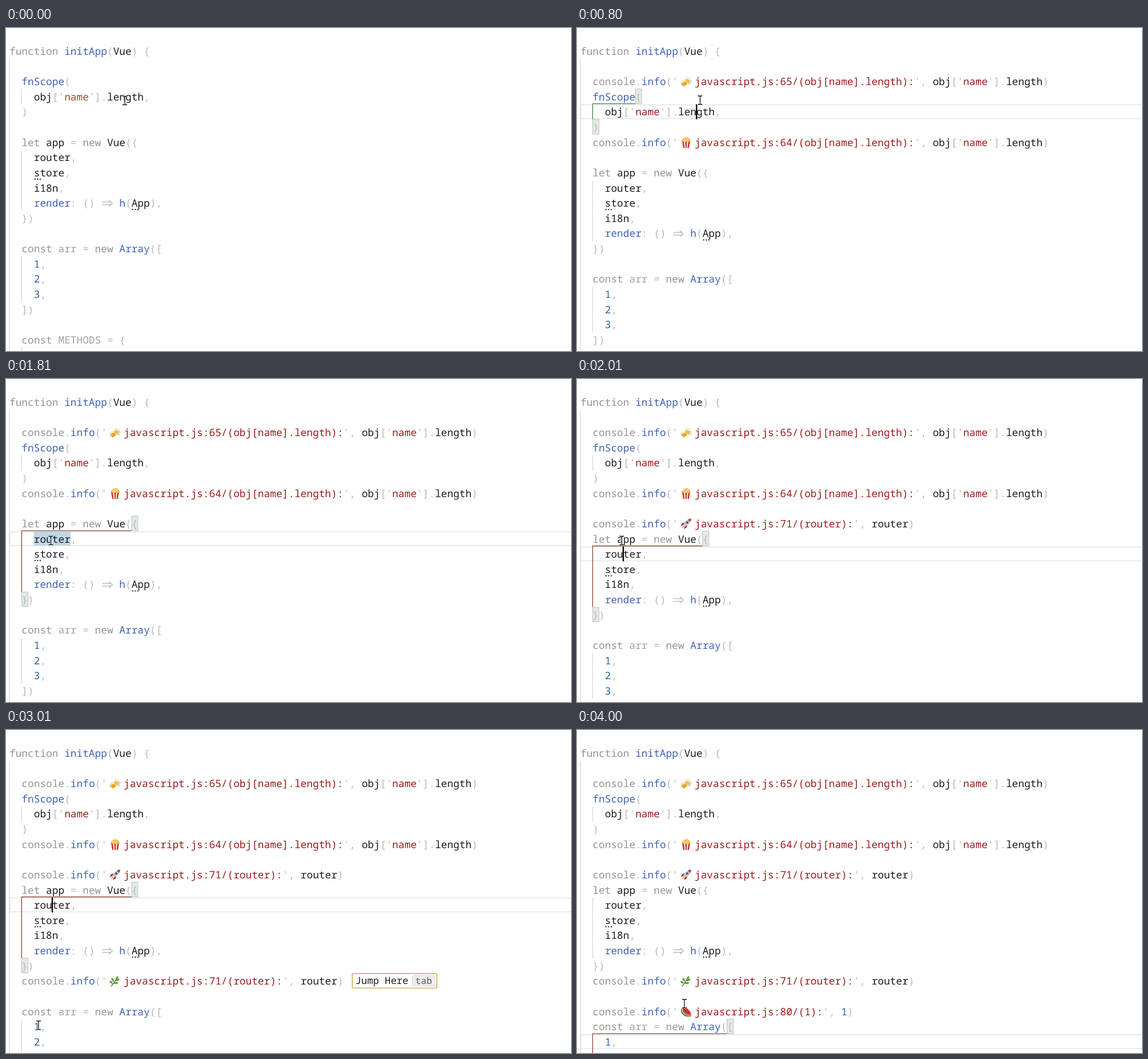
Animation, 989 px wide and 566 px high, one loop 4.2 s. Source, as an HTML page:

```html
<!DOCTYPE html>
<html lang="en">
<head>
<meta charset="utf-8">
<title>Console log insertion</title>
<style>
  html, body { margin: 0; width: 100%; height: 100%; overflow: hidden; background: #fff; }
  svg { display: block; }
  text { font: 17.81px "Noto Sans Mono", "DejaVu Sans Mono", monospace; text-rendering: geometricPrecision; }
  .key { fill: #949494; }
  .faded { fill: #a3a3a3; }
  .fn { fill: #3f62b3; }
  .num { fill: #2c639b; }
  .str { fill: #9a1c1c; }
  .warm { fill: #9c4a2c; }
  .word { fill: #1c1c22; }
  .sym { fill: #b9b9b9; }
</style>
</head>
<body>
<svg width="989" height="566" viewBox="0 0 989 566">
  <defs>
    <g id="beer">
      <path d="M1 10l7-3 4 8-7 4z" fill="#f0a323"/>
      <path d="M10 3l8 3-3 8-7-3z" fill="#f7bd45"/>
      <path d="M1 10l7-3 1 3-7 3z" fill="#f3ead2"/>
      <path d="M9 3q2-3 5-1t5 2l-1 4-9-3z" fill="#f6eedb"/>
      <path d="M16 8l3 1-2 5-3-1M4 16l-2 0-1-4" fill="none" stroke="#b5c8d4" stroke-width="1.3"/>
    </g>
    <g id="popcorn">
      <path d="M3 8h14l-2 12H5z" fill="#fff"/>
      <path d="M3 8h3l1.5 12H5zM8.5 8h3l-.4 12H8.9zM14 8h3l-2 12h-2.5z" fill="#c93a2e"/>
      <path d="M2 9q-1-4 3-4 0-4 4-3 3-3 5 1 4 0 3 3 2 1 1 3z" fill="#f3bd55"/>
      <path d="M6 6l2-2M11 6l2-2M9 8l1-2" stroke="#fbe6ac" stroke-width="1.6"/>
    </g>
    <g id="rocket">
      <path d="M7 8Q2 8 1 14l5-2zM12 13q0 5-6 6l2-5z" fill="#b32c35"/>
      <path d="M5 12Q9 2 18 2q0 9-10 13z" fill="#b9c5ce"/>
      <path d="M13 3q3-2 6-2 0 3-2 6z" fill="#c8323c"/>
      <circle cx="12" cy="8" r="2" fill="#3d5870"/>
      <path d="M5 13l2 2-5 4z" fill="#f2a23a"/>
    </g>
    <g id="herb" fill="#5f9c3d">
      <path d="M3 19Q8 13 15 3" fill="none" stroke="#557f32" stroke-width="1.5"/>
      <path d="M11 8q-1-5 4-7 2 5-4 7zM8 11Q2 9 4 4q5 2 4 7zM6 14q-5 1-6-4 5-1 6 4zM10 10q2-5 8-4-2 5-8 4zM7 14q4-4 9-1-4 4-9 1z"/>
    </g>
    <g id="melon">
      <path d="M2 4Q-1 11 5 16t15 2z" fill="#3e7a3a"/>
      <path d="M3 3Q1 10 6 14t13 3z" fill="#dcebc0"/>
      <path d="M5 2Q2 9 7 13t12 3Q18 6 5 2z" fill="#dd3b3f"/>
      <path d="M7 6v2M10 9v2M12 6v2M14 11v2" stroke="#44201d" stroke-width="1.4"/>
    </g>
  </defs>
  <g id="stage"></g>
</svg>
<script>
const LOOP = 4200, LEFT = 6, TOP = 27.3, CW = 10.685, LH = 26.63, ICON = 29;
const STEPS = [0, 200, 400, 800, 1000, 1210, 1400, 1810, 2010, 2210, 2410,
               2610, 2810, 3010, 3210, 3410, 3600, 4000];
const MOUSE = [[0, 208, 127], [400, 215.5, 126.5], [1000, 78.5, 283], [2410, 92, 365.5],
               [2610, 89.5, 432], [2810, 53.5, 527.5], [3010, 57, 517.5],
               [3210, 61, 514.5], [3410, 183, 480.5], [3600, 188, 479.5]];
const stage = document.getElementById('stage');

const colX = c => LEFT + c * CW;
const rowY = r => TOP + r * LH;
const within = (t, a, b) => t >= a && t < b;
const rect = (x, y, w, h, attrs) =>
  `<rect x="${x}" y="${y}" width="${w}" height="${h}" ${attrs}/>`;
const path = (d, color, width) =>
  `<path d="${d}" fill="none" stroke="${color}" stroke-width="${width}"/>`;
const label = (x, y, cls, s, style = '') =>
  `<text x="${x}" y="${y}" class="${cls}" style="${style}">${s}</text>`;

// "~" marks the slot of an icon
const log = (icon, msg, arg) => ({ icon, text: `  console.info('~javascript.js:${msg}:', ${arg})` });

function getLines(t) {
  const scope = '(obj[name].length)', arg = "obj['name'].length";
  return [
    'function initApp(Vue) {', '',
    t >= 800 && log('beer', '65/' + scope, arg),
    '  fnScope(', `    ${arg},`, '  )',
    t >= 400 && log('popcorn', '64/' + scope, arg),
    '',
    t >= 2010 && log('rocket', '71/(router)', 'router'),
    '  let app = new Vue({', '    router,', '    store,', '    i18n,',
    '    render: () => h(App),', '  })',
    t >= 2210 && log('herb', '71/(router)', 'router'),
    '',
    t >= 3600 && log('melon', '80/(1)', '1'),
    '  const arr = new Array([', '    1,', '    2,', '    3,', '  ])', '',
    '  const METHODS = {', '    close()'
  ].filter(l => l !== false).map(l => l.text ? l : { text: l });
}

const KINDS = [
  ['key', /^(function|let|new|const|console)$/],
  ['faded', /^(arr|METHODS)$/],
  ['fn', /^(initApp|fnScope|Array|info|render|h)$/],
  ['num', /^\d+$/],
  ['word', /^\w+$/],
  ['sym', /./]
];

function drawLine({ text, icon }, row, t) {
  const y = rowY(row), base = y + 19.6, slot = text.indexOf('~');
  const at = i => colX(i) + (slot >= 0 && i > slot ? ICON - CW : 0);
  let out = '';
  for (const m of text.matchAll(/'[^']*'|\w+|=>|[^\w\s']+/g)) {
    const s = m[0], i = m.index;
    if (s[0] === "'") {
      const skip = icon && s[1] === '~' ? 2 : 1, end = i + s.length - 1;
      const cls = !icon && t < 800 ? 'warm' : 'str';
      out += label(at(i), base, 'sym', "'") + label(at(i + skip), base, cls, s.slice(skip, -1)) +
             label(at(end), base, 'sym', "'");
    } else if (s === '=>') {
      const x = at(i), c = y + 13.7;
      out += path(`M${x + 2} ${c - 2.4}h15M${x + 2} ${c + 2.4}h15M${x + 14} ${c - 5.5}l6 5.5-6 5.5`, '#b4b4b4', 1.3);
    } else {
      let cls = KINDS.find(k => k[1].test(s))[0];
      if (s === 'arr' && within(t, 2210, 2410)) cls = 'word';
      out += label(at(i), base, cls, s);
      if (s === 'store' || s === 'App')
        for (let k = 0; k < 3; k++) out += rect(at(i) + .8 + k * 4.6, y + 23.4, 2.4, 2.2, 'fill="#4b4655"');
    }
  }
  if (icon) out += `<use href="#${icon}" x="${colX(slot) + 4}" y="${y + 3.2}"/>`;
  return out;
}

function getFocus(t) {
  if (t < 200) return null;
  if (t < 1210) return { line: '    obj', col: 19, color: '#3f8a45' };
  if (t < 3210) return { line: '    router', col: 7, color: '#8a4a3a' };
  return { line: '    1', col: 5, color: '#8a4a3a' };
}

function drawFocus(f, lines, t) {
  const row = lines.findIndex(l => l.text.startsWith(f.line)), y = rowY(row);
  const open = row - 1, openCol = lines[open].text.length - 1;
  const close = lines.findIndex((l, i) => i > row && /^  [)}\]]/.test(l.text));
  const box = (r, c) => rect(colX(c) + .2, rowY(r) - .2, CW + .2, LH - 1,
    'fill="#e4ebe4" stroke="#bdc1bd"');
  let back = rect(LEFT + .5, y + .7, 1000, LH - 2.4, 'fill="none" stroke="#ebebeb" stroke-width="2"');
  back += box(open, openCol) + box(close, 2);
  if (within(t, 1400, 2010)) back += rect(colX(4), y, CW * 6, LH - 1.6, 'fill="#c1d7e5"');
  const guide = path(`M${colX(openCol)} ${y - 1.1}H27.4V${rowY(close) - .5}`, f.color, 1.3);
  const blinkOn = t < 1810 || within(t, 2010, 2210) || within(t, 3010, 4000);
  const caret = blinkOn ? rect(colX(f.col) - 1, y, 2.4, LH - .6, 'fill="#000"') : '';
  return { back, guide, caret };
}

function drawBadge() {
  return rect(606.2, 426.7, 148, 25.4, 'rx="2" fill="#fff" stroke="#c9a53c" stroke-width="1.4"') +
    label(611.5, 445.4, 'word', 'Jump Here', 'font-size:17.2px') +
    rect(711.5, 430.3, 39.5, 18, 'rx="3" fill="#eeeeee" stroke="#d6d6d6"') +
    label(716.5, 445, 'key', 'tab', 'font-size:16.2px;fill:#5c5c5c');
}

function drawMouse(t) {
  const [, x, y] = MOUSE.filter(m => m[0] <= t).pop();
  const d = `M${x - 4} ${y - 7.5}h3l1 1 1-1h3M${x} ${y - 6.5}v13M${x - 4} ${y + 7.5}h3l1-1 1 1h3`;
  return path(d, '#fff', 2.6) + path(d, '#111', 1.3);
}

function draw(t) {
  const lines = getLines(t), focus = getFocus(t);
  const f = focus ? drawFocus(focus, lines, t) : { back: '', guide: '', caret: '' };
  let guides = path(`M${LEFT} ${rowY(1)}V566`, '#d6d6d6', 1.3), code = '';
  lines.forEach((l, r) => {
    if (l.text.startsWith('    ')) guides += path(`M27.4 ${rowY(r)}v${LH}`, '#d6d6d6', 1.3);
    code += drawLine(l, r, t);
  });
  const badge = within(t, 2610, 3210) ? drawBadge() : '';
  stage.innerHTML = f.back + guides + f.guide + code + f.caret + badge + drawMouse(t);
}

let shown = -1;
function tick() {
  const now = performance.now() % LOOP;
  const step = STEPS.filter(s => s <= now).pop();
  if (step !== shown) draw(shown = step);
  requestAnimationFrame(tick);
}
tick();
</script>
</body>
</html>
```
